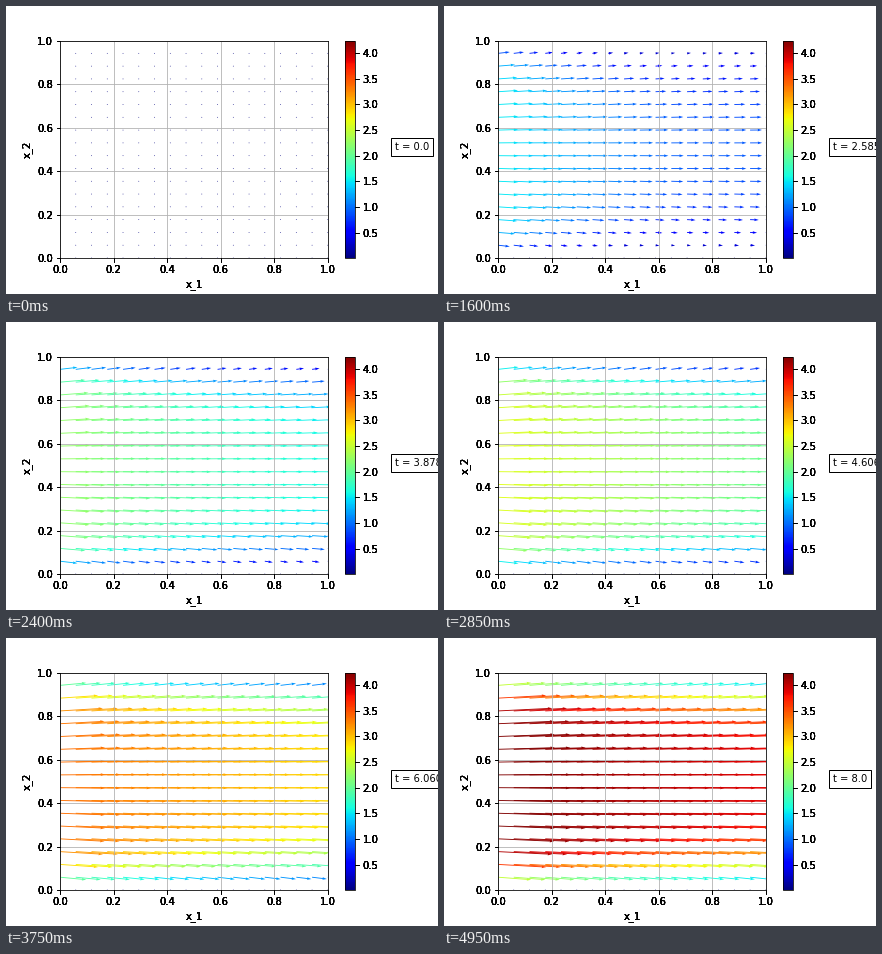
A matplotlib script for the animation above (5 s loop, 432x288 px).

```python
import numpy as np
import matplotlib.pyplot as plt
from matplotlib.animation import FuncAnimation

FRAMES, INTERVAL = 100, 50
T_END = 8.0
PEAK = 6 * np.sin(np.pi / 4)

plt.rcParams.update({"font.family": "DejaVu Sans", "font.size": 10})

times = np.linspace(0, T_END, FRAMES)
axis = np.linspace(0, 1, 18)
X, Y = np.meshgrid(axis, axis)
D = 2 * Y - 1  # signed distance from the channel's centre line


def velocity(t):
    """Channel flow with a growing inflow on the left."""
    inflow = 6 * np.sin(np.pi * t / 32)
    decay = 4.6 * max(t, 0.05) ** -1.85

    # the profile is flat at the inlet and rounder downstream
    power = 3.5 + 3.5 * np.exp(-2.2 * X)
    power *= 1 - 0.8 * np.exp(-(t / 3.2) ** 2) * (1 - np.exp(-4 * X))
    profile = 1 - np.abs(D) ** power

    outlet = 0.38 * t * np.exp(-t ** 2 / 4.2) * np.exp(-((1 - X) / 0.25) ** 2)
    inside = np.abs(D) < 0.999
    u = (inflow * np.exp(-decay * X) * profile + outlet) * inside

    spread = 0.2 * (1 - np.exp(-(t / 3) ** 2)) * np.exp(-2 * decay * X)
    v = spread * np.sin(2.2 * D) * inside
    return u, v


def harden(artist, passes=6):
    """Paint an artist several times so its soft edges turn solid."""
    draw = artist.draw
    artist.draw = lambda renderer: [draw(renderer) for _ in range(passes)]


fig, ax = plt.subplots(figsize=(6, 4), dpi=72, facecolor="white")
fig.subplots_adjust(left=0.125, right=0.9, bottom=0.125, top=0.88)

zero = np.zeros_like(X)
arrows = ax.quiver(X, Y, zero, zero, zero, cmap="jet", scale=20,
                   width=0.06 / 18)
arrows.set_clim(0.01, PEAK)
bar = fig.colorbar(arrows, ax=ax)

ax.set(xlim=(0, 1), ylim=(0, 1), xlabel="x_1", ylabel="x_2")
ax.grid(True)
clock = fig.text(0.9, 0.5, "", bbox=dict(facecolor="white"))

fig.canvas.draw()
for ruler in (ax.xaxis, ax.yaxis, bar.ax.yaxis):
    harden(ruler.label)
    for tick in ruler.get_major_ticks():
        harden(tick.label1)
        harden(tick.label2)
        harden(tick.tick1line)
        harden(tick.tick2line)


def update(i):
    t = times[i]
    u, v = velocity(t)
    arrows.set_UVC(u, v, np.hypot(u, v))
    clock.set_text(f"t = {float(t)}")
    return arrows, clock


anim = FuncAnimation(fig, update, frames=FRAMES, interval=INTERVAL,
                     repeat=True, repeat_delay=0, blit=False)
plt.show()
```
